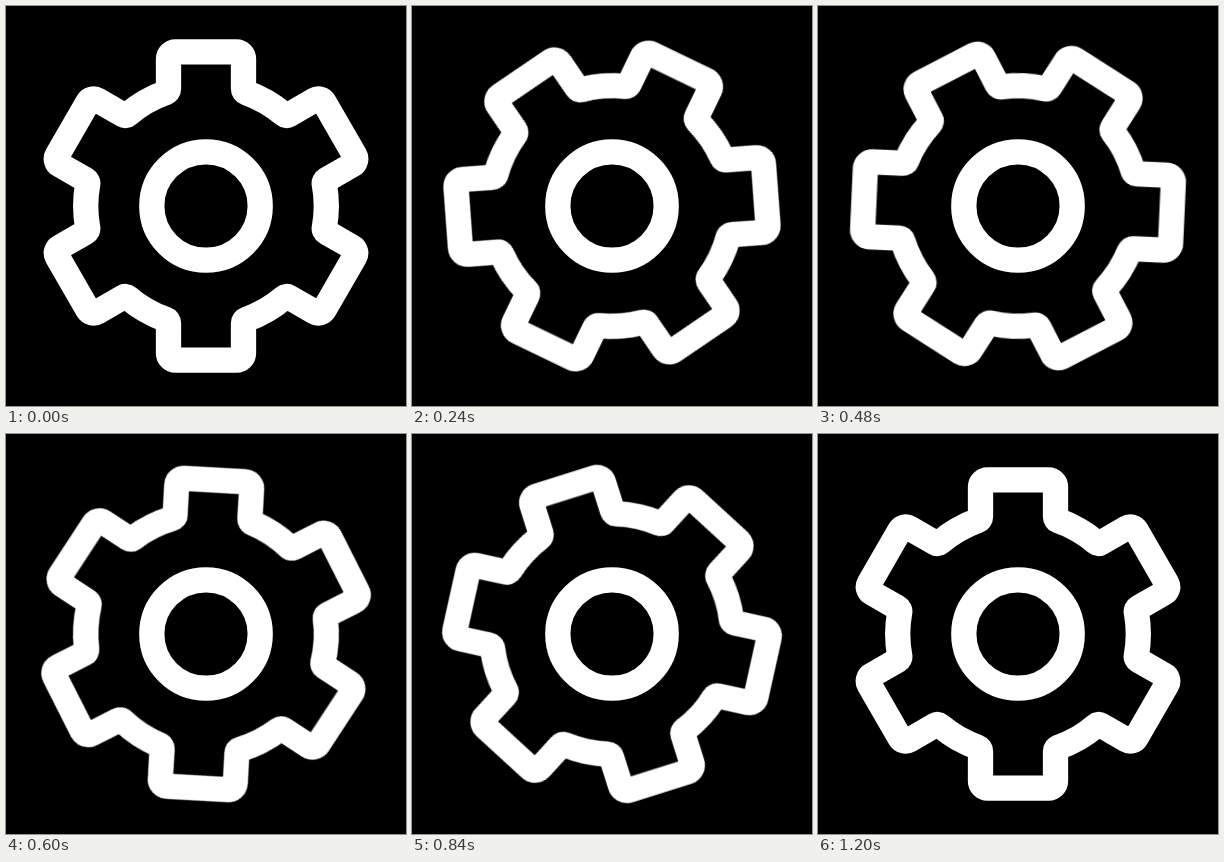
An HTML page for the animation above (1260 ms loop, 400 by 400 pixels).

```html
<!DOCTYPE html>
<html lang="en">
<head>
<meta charset="utf-8">
<title>Turning gear</title>
<style>
  html, body { margin: 0; width: 100%; height: 100%; overflow: hidden; background: #000; }
  svg { display: block; width: 100vw; height: 100vh; }
</style>
</head>
<body>
<svg viewBox="-200 -200 400 400" fill="none" stroke="#fff" stroke-width="25.3" stroke-linejoin="round">
  <path id="gear"/>
  <circle r="54.2"/>
</svg>
<script>
const TEETH = 6, ROOT = 120.3, TIP = 154.2, HALF = 37.5, ROUND = 7, FILLET = 3;
const STEP = 30, TURN = 1200, LOOP = 1260;
const gear = document.getElementById('gear');

function gearPath() {
  const base = Math.sqrt(ROOT ** 2 - HALF ** 2);
  const rootAngle = Math.asin(HALF / ROOT) + FILLET / ROOT;
  const rootX = ROOT * Math.sin(rootAngle), rootY = ROOT * Math.cos(rootAngle);
  let d = '';
  for (let k = 0; k < TEETH; k++) {
    const a = k * 2 * Math.PI / TEETH, c = Math.cos(a), s = Math.sin(a);
    // x runs across the tooth, y outwards
    const p = (x, y) => `${(x * c + y * s).toFixed(2)} ${(x * s - y * c).toFixed(2)} `;
    const corner = `A${ROUND} ${ROUND} 0 0 1 `;
    d += (k ? `A${ROOT} ${ROOT} 0 0 1 ` : 'M') + p(-rootX, rootY)
      + 'Q' + p(-HALF, base) + p(-HALF, base + FILLET)
      + 'L' + p(-HALF, TIP - ROUND) + corner + p(ROUND - HALF, TIP)
      + 'L' + p(HALF - ROUND, TIP) + corner + p(HALF, TIP - ROUND)
      + 'L' + p(HALF, base + FILLET) + 'Q' + p(HALF, base) + p(rootX, rootY);
  }
  return d + `A${ROOT} ${ROOT} 0 0 1 ${-rootX} ${-rootY}Z`;
}

// cubic-bezier(.33, 0, .383, 1)
function ease(x) {
  let lo = 0, hi = 1;
  for (let i = 0; i < 40; i++) {
    const s = (lo + hi) / 2, q = 1 - s;
    if (3 * .33 * s * q * q + 3 * .383 * s * s * q + s ** 3 < x) lo = s; else hi = s;
  }
  return lo * lo * (3 - 2 * lo);
}

gear.setAttribute('d', gearPath());

const frames = [];
for (let t = 0; t <= TURN; t += STEP) {
  frames.push({ offset: t / LOOP, transform: `rotate(${180 * ease(t / TURN)}deg)`, easing: 'step-end' });
}
frames.push({ offset: 1, transform: 'rotate(180deg)' });
gear.animate(frames, { duration: LOOP, iterations: Infinity });
</script>
</body>
</html>
```
